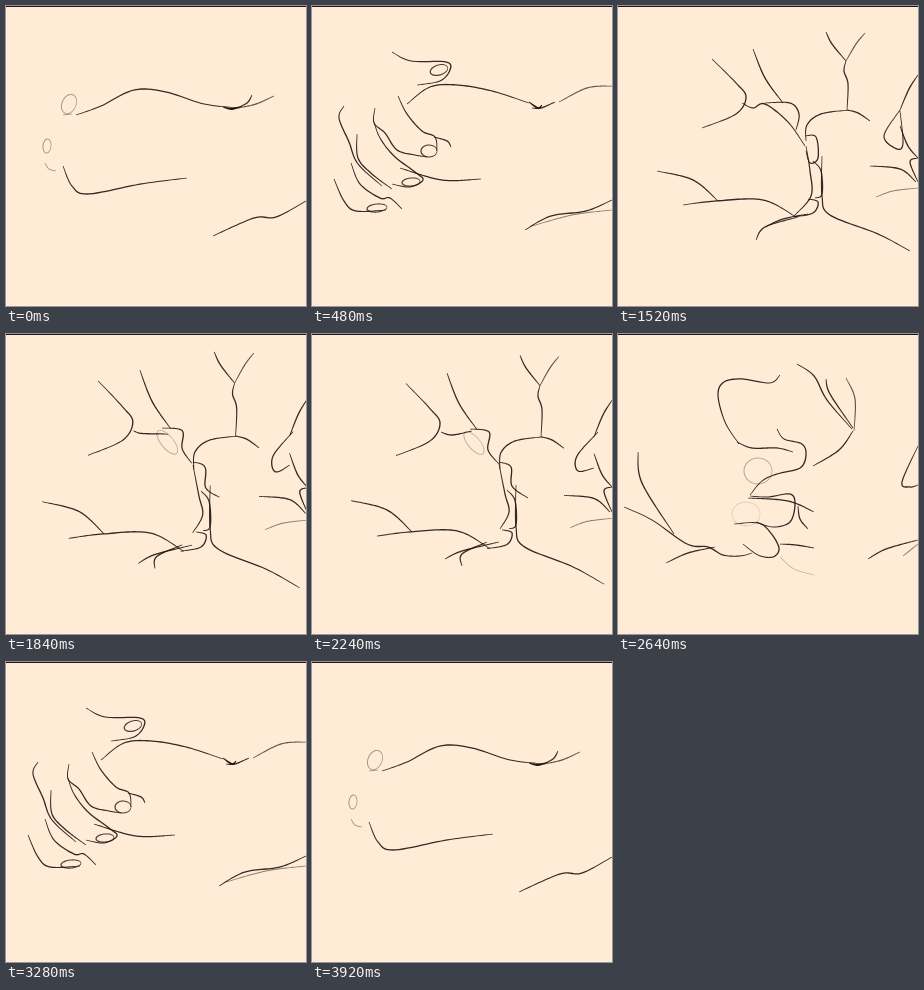
Recreate the animation shown at these times as an HTML page with a canvas. Size 300x300 px, loop 4000 ms.

```html
<!DOCTYPE html>
<html>
<head>
<meta charset="utf-8">
<style>
html, body { margin: 0; overflow: hidden; background: #ffebd6; }
canvas { display: block; }
</style>
</head>
<body>
<canvas id="stage" width="300" height="300"></canvas>
<script>
const ctx = document.getElementById('stage').getContext('2d');
const SAMPLES = 48, LOOP = 4000;
// Pen pressure for strokes that are not drawn at normal strength.
const PRESSURE = { crease: 1.6, right: 0.7, leg2: 0.5, faint: 0.25, tip: 0.4, tip2: 0.4 };

// A stroke is a smooth curve through a few key points, or an oval.
const rest = pose({
  top: '70,109 95,100 128,84 160,86 198,98 234,102',
  crease: '217,101 226,103 236,100',
  flick: '234,101 242,96 246,89',
  right: '268,90 250,98 232,102',
  low: '57,160 66,180 82,188 135,178 181,172',
  leg: '207,230 248,212 270,211 300,195',
  nail1: oval(63, 98, 7, 10, 0.4, 0.4),
  nail2: oval(41, 140, 4, 7, 0.1, 0.4),
  tip: '39,157 43,163 50,165',
  tip2: '57,109 66,108'
});

const open = pose({
  top: '95,98 118,81 145,79 180,85 217,97',
  crease: '217,96 226,102 230,99',
  flick: '220,102 229,102 243,96',
  right: '300,80 275,82 247,96',
  low: '88,162 130,174 169,173',
  leg: '213,224 239,210 274,205 300,194',
  leg2: '220,220 260,209 300,204',
  thumb: '80,46 99,55 134,56 138,64 128,75 105,79',
  nail1: oval(127, 64, 9, 5, -0.3, 0.8),
  index: '63,102 62,117 73,127 85,144 103,149 115,151',
  index2: '86,90 95,108 110,125 123,131 125,145',
  knuckle: '122,131 135,135 139,141',
  nail2: oval(117, 145, 8, 6, 0, 0.8),
  middle: '32,100 27,112 37,136 46,158 70,180',
  middle2: '62,116 68,132 82,150 103,166 111,174 98,181 80,178',
  nail3: oval(99, 176, 9, 4, -0.1, 0.8),
  ring: '45,128 46,152 60,168 80,183',
  small: '22,173 32,195 44,205 74,204',
  small2: '39,157 48,178 68,192 78,192 90,203',
  nail4: oval(65, 202, 10, 4, -0.1, 0.8)
});

const grab = pose({
  top: '166,41 184,45 198,62 205,79 217,93 229,103',
  mid: '223,65 220,80 229,102',
  right: '277,50 262,62 253,83 229,103',
  crease: '224,98 229,104 233,100',
  down: '229,103 214,115 206,136',
  low: '134,137 148,158 164,175 187,187',
  low2: '117,160 125,178 138,195 169,209',
  leg: '252,217 280,206 300,201',
  thumb: '90,55 100,40 113,31 126,32 132,45 131,66',
  nail1: oval(135, 41, 3, 7, 0.3, 0.5),
  thumb2: '110,80 113,72 126,66',
  index: '131,66 114,67 89,63 69,72 75,92 91,107 103,124 112,130',
  index2: '112,130 122,122 134,127 136,137 126,150 114,158',
  faint: '70,86 80,72 110,68',
  middle: '33,93 40,115 55,131 69,132',
  middle2: '33,93 52,101 64,112 70,132 82,150 97,159 118,156',
  nail2: oval(37, 145, 8, 11, -0.7, 0.4),
  ring: '30,150 50,160 60,178 70,191 88,186',
  ring2: '118,158 115,178 105,191 88,192',
  small: '0,156 14,162 20,187 32,189',
  small2: '23,164 28,178 37,208 47,213 80,208 87,198 72,188',
  nail3: oval(47, 202, 10, 8, 0, 0.25),
  bottom: '90,190 105,195 127,206'
});

const squeeze = pose({
  top: '208,26 214,38 228,55',
  right: '247,27 238,38 228,55',
  down: '228,55 226,65 230,78 229,104',
  arc: '231,104 203,108 189,119 188,135',
  arc2: '229,104 240,107 252,115',
  low: '204,150 204,190 212,209 260,228 292,245',
  thumb: '94,53 118,77 128,91 118,108 84,122',
  thumb2: '135,43 147,72 165,97',
  index: '124,97 135,102 147,98 170,116 187,140',
  index2: '147,97 172,97 181,108 178,124',
  middle: '187,130 198,131 200,152 192,157 188,145',
  ring: '188,140 192,165 193,190 176,210',
  ring2: '195,155 203,165 204,188 197,192',
  small: '190,193 200,196 195,207 175,211',
  thigh: '39,165 75,174 100,195',
  thigh2: '65,199 98,195 145,194 178,211',
  bottom: '138,234 147,221 180,211',
  bottom2: '147,221 165,213 190,208',
  hip: '300,69 291,83 282,104',
  hip2: '282,104 266,130 279,143 285,137 282,105',
  hip3: '282,120 290,140 300,152',
  hip4: '300,152 292,156 300,176',
  leg: '252,160 282,163 298,176',
  leg2: '258,191 275,185 300,182'
});

// The same grip, stretched upright by the pressure, with the fingers rolled.
const press = {
  ...warp(squeeze, (x, y) => [x, 130 + (y - 130) * 1.045]),
  ...pose({
    index: '129,98 140,101 160,97',
    index2: '158,95 177,98 176,116 187,130',
    nail1: oval(162, 109, 6, 14, -0.7, 0.3),
    middle: '187,128 199,133 200,152 216,164',
    ring: '187,130 193,160 197,178 188,195',
    hip2: '286,98 265,122 266,137 282,134',
    bottom: '133,225 150,217 187,208',
    bottom2: '150,232 150,220 175,208'
  })
};

const release = pose({
  top: '179,30 196,42 209,66 234,95',
  mid: '208,45 212,60 235,94',
  right: '228,44 237,65 236,97',
  down: '235,97 221,116 195,132',
  low: '162,210 178,211 196,214',
  faint: '162,223 176,235 196,241',
  thumb: '162,41 152,49 124,45 106,48 100,61 107,88 121,110',
  thumb2: '119,108 134,114 159,114 175,118',
  index2: '159,95 166,105 184,110 188,121 182,134 159,140 144,147 132,161',
  nail1: oval(140, 137, 14, 13, 0, 0.35),
  middle: '132,162 150,163 172,160 177,170 172,188 155,193 138,188',
  middle2: '130,164 170,167 196,178',
  knuckle: '180,172 182,185 190,195',
  nail2: oval(128, 180, 14, 12, 0, 0.15),
  ring: '116,190 140,189 152,198 161,214 155,223 140,221 125,210',
  thigh: '20,118 24,149 56,200',
  thigh2: '6,173 34,186 69,210 90,213 105,221 122,222 134,219',
  bottom: '48,229 70,219 97,213',
  hip2: '300,112 284,148 292,153 300,151',
  leg: '250,225 268,215 300,206',
  leg2: '285,222 300,210'
});

const away = {
  ...warp(open, (x, y) => [x - 12, y + 2]),
  ...Object.fromEntries(['top', 'crease', 'flick', 'right', 'low', 'leg'].map(n => [n, rest[n]]))
};
const peak = warp(press, (x, y) => [195 + (x - 195) * 1.02, 130 + (y - 130) * 1.04]);

const keys = [
  [0, rest], [40, away], [480, open], [960, grab], [1520, squeeze], [1920, peak],
  [2080, peak], [2240, press], [2640, release], [3280, open], [3840, away],
  [3920, rest], [LOOP, rest]
];

function pose(strokes) {
  const out = {};
  for (const name in strokes) {
    const s = strokes[name];
    out[name] = s.pts ? s : {
      ink: PRESSURE[name] || 0.9,
      pts: resample(s.split(' ').map(p => p.split(',').map(Number)))
    };
  }
  return out;
}

function oval(x, y, rx, ry, tilt, ink) {
  const cos = Math.cos(tilt), sin = Math.sin(tilt);
  const pts = Array.from({ length: SAMPLES }, (_, i) => {
    const a = 2 * Math.PI * i / (SAMPLES - 1), u = rx * Math.cos(a), v = ry * Math.sin(a);
    return [x + u * cos - v * sin, y + u * sin + v * cos];
  });
  return { ink, pts };
}

function warp(strokes, fn) {
  const out = {};
  for (const name in strokes) {
    const { ink, pts } = strokes[name];
    out[name] = { ink, pts: pts.map(p => fn(...p)) };
  }
  return out;
}

// Evenly timed samples of a Catmull-Rom curve through the points.
function resample(p) {
  return Array.from({ length: SAMPLES }, (_, n) => {
    const s = n / (SAMPLES - 1) * (p.length - 1), i = Math.min(Math.floor(s), p.length - 2), u = s - i;
    const b = p[i], c = p[i + 1], a = p[i - 1] || b, d = p[i + 2] || c;
    return [0, 1].map(k => b[k] + 0.5 * u * (c[k] - a[k] +
      u * (2 * a[k] - 5 * b[k] + 4 * c[k] - d[k] + u * (3 * (b[k] - c[k]) + d[k] - a[k]))));
  });
}

function mix(a, b, u) {
  return a.map((v, i) => v + (b[i] - v) * u);
}

// Fill a ribbon along the curve that is thin at both ends.
function drawStroke({ ink, pts }) {
  const left = [], right = [];
  pts.forEach(([x, y], i) => {
    const a = pts[Math.max(0, i - 1)], b = pts[Math.min(SAMPLES - 1, i + 1)];
    const dx = b[0] - a[0], dy = b[1] - a[1];
    const w = (0.35 + 0.35 * ink * Math.sin(Math.PI * i / (SAMPLES - 1))) / (Math.hypot(dx, dy) || 1);
    left.push([x - dy * w, y + dx * w]);
    right.unshift([x + dy * w, y - dx * w]);
  });
  ctx.globalAlpha = Math.min(1, ink);
  ctx.fillStyle = '#1c1412';
  ctx.beginPath();
  for (const p of left.concat(right)) ctx.lineTo(...p);
  ctx.fill();
  ctx.globalAlpha = 1;
}

// Drawings are held for 80 ms, with a few quicker ones.
function hold(t) {
  const step = t < 80 || (t >= 960 && t < 1120) ? 40 : 80;
  return Math.floor(t / step) * step;
}

function draw(t) {
  const i = keys.findIndex(([end]) => end > t);
  const [start, from] = keys[i - 1], [end, to] = keys[i];
  const v = (t - start) / (end - start), u = v * v * (3 - 2 * v);

  ctx.fillStyle = '#ffebd6';
  ctx.fillRect(0, 0, 300, 300);
  for (const name of new Set([...Object.keys(from), ...Object.keys(to)])) {
    const a = from[name], b = to[name];
    if (a && b) {
      drawStroke({ ink: a.ink + (b.ink - a.ink) * u, pts: a.pts.map((p, k) => mix(p, b.pts[k], u)) });
    } else if (a ? u < 0.5 : u >= 0.5) {
      drawStroke(a || b);
    }
  }
  ctx.fillStyle = '#1c1412';
  ctx.fillRect(0, 0, 300, 1);
}

const began = performance.now();
function tick() {
  draw(hold((performance.now() - began) % LOOP));
  requestAnimationFrame(tick);
}
tick();
</script>
</body>
</html>
```
